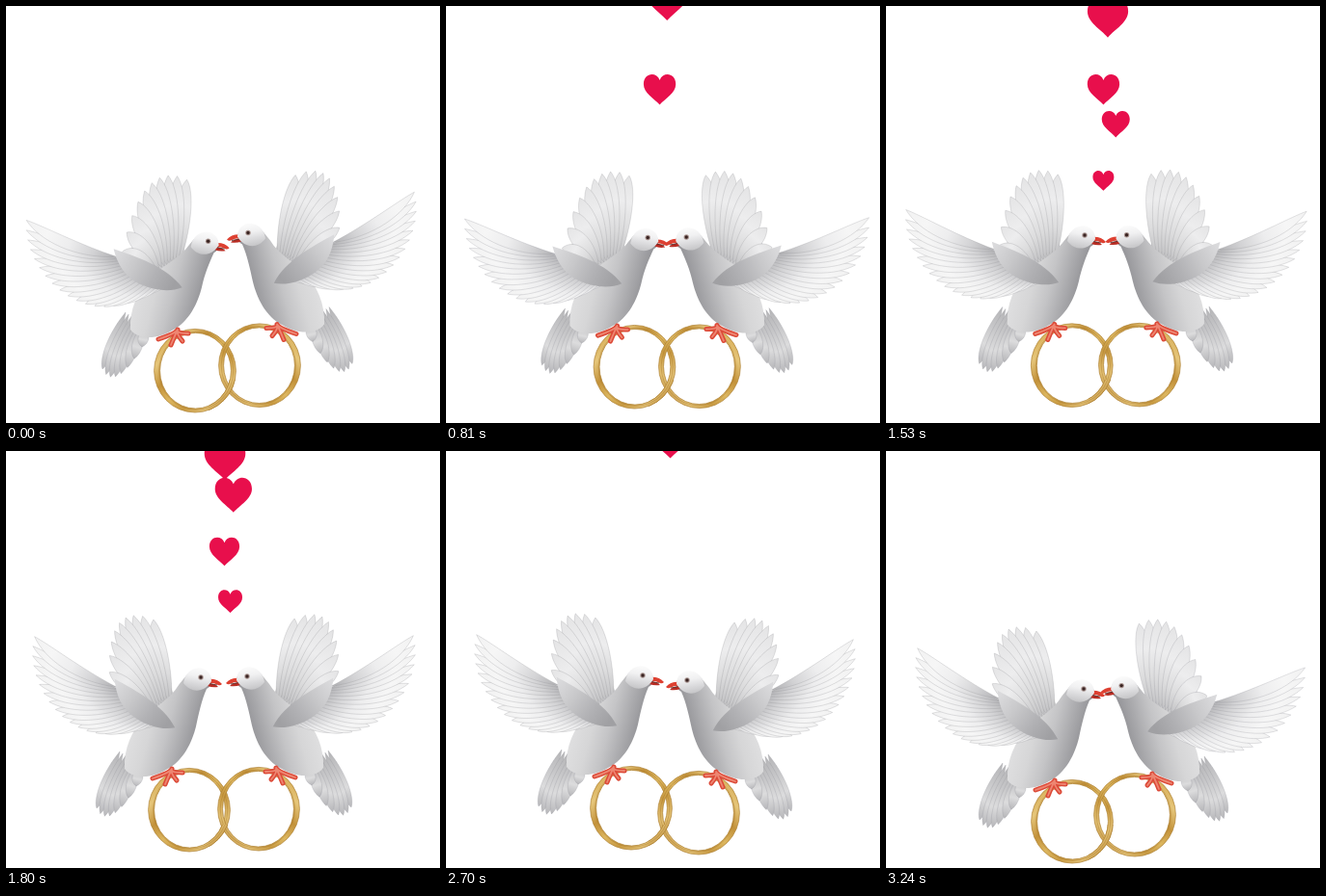
An HTML page with a canvas that plays this animation: 450x433 px, repeating every 3300 ms.

```html
<!DOCTYPE html>
<html lang="en">
<head>
<meta charset="utf-8">
<title>Doves and rings</title>
<style>
  html, body { margin: 0; width: 100%; height: 100%; overflow: hidden; background: #fff; }
  canvas { display: block; width: 450px; height: 433px; }
</style>
</head>
<body>
<canvas id="stage" width="450" height="433"></canvas>
<script>
const ctx = document.getElementById('stage').getContext('2d');
const LOOP = 3300, STEP = 30;
const RING = { x: 196, y: 379 };

// Key poses: ring centre and wing beats counted so far (whole = raised).
const TIMES = [0, 420, 1230, 1800, 2160, 2700, 3240];
const LEFT = {
  side: 1,
  x: [196, 195, 196, 190, 189, 192, 193],
  y: [379, 376, 374, 373, 379, 371, 385],
  beat: [.35, 1.35, 3.5, 5, 5.65, 7, 8]
};
const RIGHT = {
  side: -1,
  x: [263, 262, 264, 262, 259, 262, 258],
  y: [373.5, 375, 374, 372, 372, 376, 378],
  beat: [0, .77, 2.55, 4, 5, 6, 7.4]
};

// Birth time and first x; each heart drifts towards the middle.
const HEARTS = [[52, 228], [378, 217], [838, 230], [1098, 223], [1224, 241],
  [1430, 225], [1611, 233], [1915, 237]];

const mix = (a, b, k) => a + (b - a) * k;
const ease = k => (1 - Math.cos(Math.PI * k)) / 2;
const mixPoint = (a, b, k) => [mix(a[0], b[0], k), mix(a[1], b[1], k)];

// Point on a Bezier curve of any degree.
function curve(points, k) {
  if (points.length === 1) return points[0];
  return curve(points.slice(1).map((p, i) => mixPoint(points[i], p, k)), k);
}

function pose(bird, t) {
  let i = 0;
  while (i < TIMES.length - 2 && t >= TIMES[i + 1]) i++;
  const k = Math.min(1, (t - TIMES[i]) / (TIMES[i + 1] - TIMES[i]));
  const at = (list, u) => mix(list[i], list[i + 1], u);
  return {
    x: at(bird.x, ease(k)),
    y: at(bird.y, ease(k)),
    lift: (1 + Math.cos(2 * Math.PI * at(bird.beat, k))) / 2
  };
}

function shade(x0, y0, x1, y1, colors) {
  const g = ctx.createLinearGradient(x0, y0, x1, y1);
  colors.forEach((c, i) => g.addColorStop(i / (colors.length - 1), c));
  return g;
}

function shape(d, fill) {
  ctx.fillStyle = fill;
  ctx.fill(new Path2D(d));
}

function feather([x0, y0], [x1, y1], w, bend, colors) {
  const dx = x1 - x0, dy = y1 - y0, len = Math.hypot(dx, dy);
  const at = (k, off) => [x0 + dx * k - dy / len * off, y0 + dy * k + dx / len * off];
  const h = w * .65;
  ctx.beginPath();
  ctx.moveTo(x0, y0);
  ctx.bezierCurveTo(...at(.4, bend + h), ...at(.86, bend * .6 + h), x1, y1);
  ctx.bezierCurveTo(...at(.8, bend * .6 - h), ...at(.4, bend - h), x0, y0);
  ctx.fillStyle = shade(x0, y0, x1, y1, colors);
  ctx.fill();
  ctx.strokeStyle = 'rgba(140,140,146,.3)';
  ctx.stroke();
}

// Feathers spread from a line of roots to a curve of tips.
function fan(count, roots, tips, w, bend, colors) {
  for (let i = 0; i < count; i++) {
    const k = i / (count - 1);
    feather(curve(roots, k), curve(tips, k), w, mix(bend[0], bend[1], k), colors);
  }
}

function farWing(lift) {
  ctx.save();
  ctx.transform(1, 0, .38 * lift, 1, -.38 * lift * 275, lift);
  shape('M186 268L187 222Q160 205 140 232L130 256L158 274Z',
    shade(178, 270, 150, 210, ['#c4c4c6', '#dededf', '#ebebec']));
  fan(10, [[182, 264], [156, 273]], [[195, 180], [150, 157], [122, 255]], 17, [-3, 3],
    ['#c2c2c4', '#dcdcdd', '#ededee', '#e4e4e5']);
  ctx.restore();
}

function nearWing(lift) {
  ctx.save();
  ctx.translate(175, 285);
  ctx.rotate(lift * 12.4 * Math.PI / 180);
  ctx.scale(1 - .015 * lift, 1 - .03 * lift);
  ctx.translate(-175, -285);
  fan(18, [[168, 290], [114, 263]], [[140, 299], [92, 345], [16, 288], [18, 229]], 12, [3, -11],
    ['#aeaeb1', '#d3d3d5', '#ededee', '#f6f6f6', '#f2f2f2']);
  shape('M110 255C134 262 166 271 183 292C170 298 152 296 138 290C124 284 115 272 110 255Z',
    shade(112, 262, 174, 290, ['#dadadc', '#c8c8ca', '#b2b2b5', '#a0a0a3']));
  ctx.restore();
}

function head(lift) {
  ctx.save();
  ctx.translate(-2 * lift, -4 * lift);
  shape('M218 251Q226 252 228 255Q222 256 217 254Z', '#b92d24');
  shape('M217 247Q227 246 232 252Q230 254 228 253Q222 250 217 251Z', '#dd4031');
  ctx.strokeStyle = '#4a2624';
  ctx.beginPath();
  ctx.moveTo(216, 251);
  ctx.lineTo(227, 253);
  ctx.stroke();
  shape('M221 249C221 239 213 234.5 206 235.5C197 237 193 244 192 251C200 262 214 261 221 249Z',
    shade(208, 236, 204, 259, ['#fafafa', '#f1f1f2', '#dadadc', '#c4c4c6']));
  for (const [r, c] of [[2.7, '#a8938f'], [1.7, '#3a2422']]) {
    ctx.fillStyle = c;
    ctx.beginPath();
    ctx.arc(210, 245, r, 0, 7);
    ctx.fill();
  }
  ctx.restore();
}

function body(lift) {
  const at = (x, y) => `${x - 2 * lift} ${y - 4 * lift}`;
  fan(8, [[124, 318], [146, 332]], [[100, 377], [112, 402], [141, 354]], 11, [1, 1],
    ['#b4b4b6', '#c6c6c8', '#dcdcdd', '#b6b6b9']);
  shape(`M${at(221, 249)}C${at(220, 240)} ${at(212, 236)} ${at(206, 237)}
    C${at(197, 238)} ${at(193, 246)} ${at(187, 253)}
    C176 264 162 270 150 282C136 296 128 316 129 336C138 348 160 345 172 337
    C190 328 199 308 203 292C206 278 ${at(211, 268)} ${at(216, 257)}
    Q${at(221, 254)} ${at(221, 249)}Z`,
    shade(140, 286, 207, 304, ['#dededf', '#d6d6d7', '#c4c4c6', '#a9a9ac', '#8e8e92']));
}

function ring() {
  const band = new Path2D();
  band.ellipse(RING.x, RING.y - .3, 42.4, 43.3, 0, 0, 7);
  band.closePath();
  const hole = new Path2D();
  hole.ellipse(RING.x + .5, RING.y - .3, 36.9, 39.3, 0, 0, 7);
  hole.closePath();
  band.addPath(hole);
  ctx.fillStyle = shade(158, 345, 234, 414,
    ['#cfa146', '#e6c67a', '#c3923a', '#dcb65f', '#c89a42', '#e3c174', '#b27f2e']);
  ctx.fill(band, 'evenodd');
  ctx.lineWidth = .7;
  ctx.strokeStyle = '#ad7f30';
  ctx.stroke(band);
  ctx.beginPath();
  ctx.ellipse(RING.x + 1.2, RING.y - .3, 38.6, 40.6, 0, 0, 7);
  ctx.strokeStyle = 'rgba(160,112,36,.55)';
  ctx.stroke();
}

function feet() {
  ctx.lineCap = ctx.lineJoin = 'round';
  const toes = [[158, 346], [171, 352], [183, 348], [189, 340]];
  for (const [w, c] of [[5, '#dc4a38'], [1.8, '#ee8672']]) {
    ctx.lineWidth = w;
    ctx.strokeStyle = c;
    ctx.beginPath();
    for (const [x, y] of toes) {
      ctx.moveTo(178, 336);
      ctx.quadraticCurveTo(176, 340, x, y);
    }
    ctx.stroke();
  }
}

function dove(lift) {
  ctx.lineWidth = .8;
  farWing(lift);
  body(lift);
  head(lift);
  nearWing(lift);
  ring();
  feet();
}

function place(bird, t, draw) {
  const { x, y, lift } = pose(bird, t);
  ctx.save();
  ctx.translate(x, y);
  ctx.scale(bird.side, 1);
  ctx.translate(-RING.x, -RING.y);
  draw(lift);
  ctx.restore();
}

function heart([birth, x], t) {
  const rise = .285 * (t - birth), y = 210 - rise;
  if (y > 206 || y < -30) return;
  const size = 20 + (198 - y) * .12;
  ctx.save();
  ctx.translate(mix(x, 230, rise / 350), y);
  ctx.scale(size, size);
  shape('M0 .47C-.18 .27 -.5 .1 -.5 -.17C-.5 -.53 -.1 -.57 0 -.3C.1 -.57 .5 -.53 .5 -.17C.5 .1 .18 .27 0 .47Z',
    '#e80f4c');
  ctx.restore();
}

function frame(now) {
  const t = Math.floor(now % LOOP / STEP) * STEP;
  ctx.fillStyle = '#fff';
  ctx.fillRect(0, 0, 450, 433);
  place(LEFT, t, dove);
  place(RIGHT, t, dove);
  // Link the rings at their lower crossing.
  ctx.save();
  ctx.beginPath();
  ctx.rect(210, 388, 40, 45);
  ctx.clip();
  place(LEFT, t, ring);
  ctx.restore();
  HEARTS.forEach(h => heart(h, t));
}

const start = performance.now();
function tick() {
  frame(performance.now() - start);
  requestAnimationFrame(tick);
}
tick();
</script>
</body>
</html>
```
